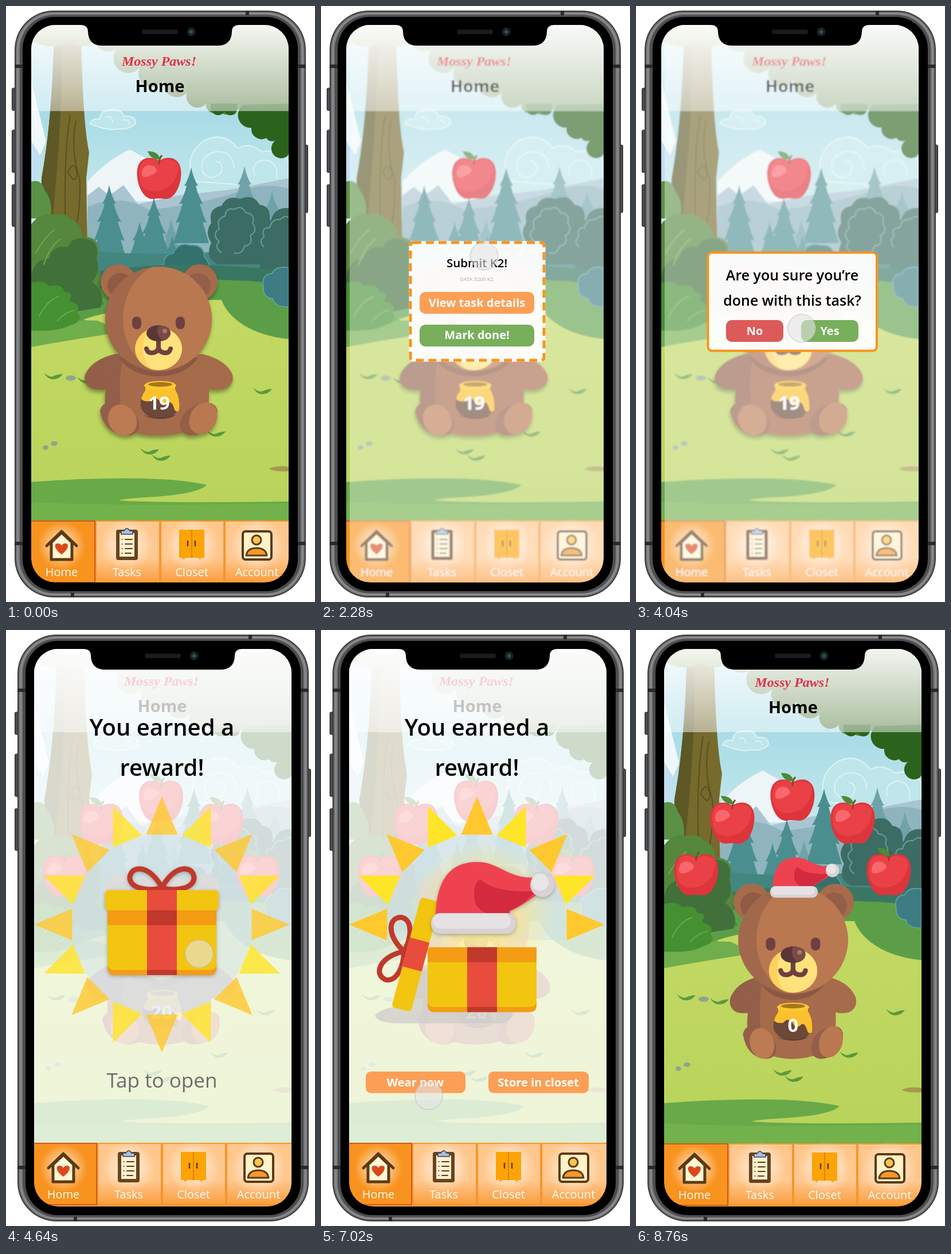
Animation, 539 px wide and 1038 px high, one loop 9680 ms. Source, as an HTML page without scripts:

```html
<!DOCTYPE html>
<html lang="en">
<head>
<meta charset="utf-8">
<title>Bear task app</title>
<style>
html, body { margin: 0; width: 100%; height: 100%; overflow: hidden; background: #fff; }
svg { display: block; width: 539px; height: 1038px; }
text { font-family: "Open Sans", "Noto Sans", sans-serif; text-anchor: middle; }
.logo { font: italic 700 24px "Liberation Serif", serif; fill: #e0304a; }
.title { font-size: 29px; font-weight: 700; }
.tab { font-size: 20px; fill: #fff; }
.count { font-size: 33px; font-weight: 700; fill: #fff; }
.btn { font-size: 20px; font-weight: 700; fill: #fff; }
.ask { font-size: 25px; font-weight: 600; }
.big { font-size: 40px; font-weight: 600; }
.shade { filter: drop-shadow(-1px 5px 3px #0005); }
.soft { filter: drop-shadow(0 2px 3px #0004); }

.phone, .dim, .task, .sure, .reward, .closed, .open, .tap { animation: 9.68s step-end infinite; }
.phone { animation-name: phone; }
.dim { animation-name: dim; }
.task { animation-name: task; }
.sure { animation-name: sure; }
.reward { animation-name: reward; }
.closed { animation-name: closed; }
.open { animation-name: open; }
.tap { animation-name: tap; }
.done { animation: done 9.68s linear infinite; }
.cursor { animation: move 9.68s linear infinite; }

@keyframes phone { 0% { transform: none; } 47.934%, 100% { transform: translate(5px, 0); } }
@keyframes dim { 0% { visibility: hidden; } 16.942% { visibility: visible; } 47.934%, 100% { visibility: hidden; } }
@keyframes task { 0% { visibility: hidden; } 16.942% { visibility: visible; } 33.678%, 100% { visibility: hidden; } }
@keyframes sure { 0% { visibility: hidden; } 33.678% { visibility: visible; } 47.934%, 100% { visibility: hidden; } }
@keyframes reward { 0% { visibility: hidden; } 47.934%, 100% { visibility: visible; } }
@keyframes closed { 0% { visibility: hidden; } 47.934% { visibility: visible; } 61.364%, 100% { visibility: hidden; } }
@keyframes open { 0% { visibility: hidden; } 61.364% { visibility: visible; } 81%, 100% { visibility: hidden; } }
@keyframes done {
  0% { opacity: 0; }
  75.62% { opacity: 0; animation-timing-function: ease-out; }
  80.99%, 100% { opacity: 1; }
}
@keyframes tap {
  0%, 16.942%, 33.678%, 47.934%, 61.364%, 75%, 100% { transform: none; }
  15.909%, 32.645%, 46.694%, 60.331%, 73.967% { transform: scale(.95); }
}
@keyframes move {
  0% { transform: translate(565px, 20px); }
  3.51% { transform: translate(565px, 20px); animation-timing-function: cubic-bezier(.16, 1, .3, 1); }
  10.74% { transform: translate(282px, 299px); }
  22.52% { transform: translate(282px, 299px); animation-timing-function: cubic-bezier(.16, 1, .3, 1); }
  32.23% { transform: translate(287px, 561px); }
  41.53% { transform: translate(287px, 561px); animation-timing-function: ease; }
  45.25% { transform: translate(337px, 564px); }
  55.37% { transform: translate(337px, 564px); animation-timing-function: ease; }
  58.88% { transform: translate(289px, 540px); }
  66.53% { transform: translate(289px, 540px); animation-timing-function: ease-in; }
  68.6% { transform: translate(356px, 680px); animation-timing-function: ease-out; }
  72.52% { transform: translate(188px, 811px); }
  73.97% { transform: translate(188px, 811px); }
  80.99% { transform: translate(187px, 797px); }
  88.22% { transform: translate(187px, 797px); animation-timing-function: ease-in; }
  90.45%, 100% { transform: translate(566px, 144px); }
}
</style>
</head>
<body>
<svg viewBox="0 0 539 1038">
<defs>
  <linearGradient id="sky" x2="0" y2="1"><stop offset=".3" stop-color="#a3d9e5"/><stop offset="1" stop-color="#d5efee"/></linearGradient>
  <linearGradient id="veil" x2="0" y2="1"><stop stop-color="#fff" stop-opacity=".95"/><stop offset="1" stop-color="#fff" stop-opacity=".48"/></linearGradient>
  <linearGradient id="grass" x2="0" y2="1"><stop stop-color="#c3d964"/><stop offset="1" stop-color="#b8d35a"/></linearGradient>
  <linearGradient id="cell" x2="0" y2="1"><stop stop-color="#ffc78c"/><stop offset=".6" stop-color="#ffc88f"/><stop offset="1" stop-color="#fb9d3d"/></linearGradient>
  <radialGradient id="glow"><stop offset=".35" stop-color="#fff" stop-opacity=".55"/><stop offset="1" stop-color="#fff" stop-opacity="0"/></radialGradient>
  <radialGradient id="gold"><stop offset=".4" stop-color="#ffe873" stop-opacity=".6"/><stop offset="1" stop-color="#ffe873" stop-opacity="0"/></radialGradient>
  <filter id="blur" x="0" y="0" width="1" height="1"><feGaussianBlur stdDeviation="1.3"/></filter>
  <clipPath id="screen"><rect x="44" y="33" width="449" height="971" rx="42"/></clipPath>
  <clipPath id="inset"><rect x="50" y="33" width="443" height="971"/></clipPath>
  <clipPath id="upper"><rect y="280" width="539" height="260"/></clipPath>
  <clipPath id="face"><ellipse cx="266" cy="545" rx="93" ry="91"/></clipPath>
  <clipPath id="snout"><ellipse cx="266" cy="597" rx="41" ry="37"/></clipPath>

  <path id="pine" d="M0 0Q4 20 12 32L8 32Q12 50 21 64L15 63Q20 82 27 97L20 95 31 132H-31L-20 95-27 97Q-20 82-15 63L-21 64Q-12 50-8 32L-12 32Q-4 20 0 0Z"/>
  <path id="tuft" d="M-16-6Q-6 2 0 0 8-4 17-4 10 6-2 5-10 4-16-6Z" fill="#5c9a3d"/>

  <g id="bg">
    <rect x="44" y="33" width="449" height="400" fill="url(#sky)"/>
    <path d="M44 130L70 236 58 264H44Z" fill="#eff7fa"/>
    <path d="M44 235L62 264 44 320Z" fill="#c3def0"/>
    <g fill="#bfe6ea" stroke="#dcf3f3" stroke-width="2">
      <path d="M328 305Q308 262 345 235 380 217 404 248 425 236 446 254 480 246 493 272V318Z"/>
      <path d="M146 205Q150 195 164 197 164 181 184 181 202 179 205 192 226 190 226 204 220 215 195 214 178 218 146 205Z"/>
      <path d="M398 284Q396 250 364 254 338 262 342 286 354 308 374 292 382 274 366 270 M472 300Q476 270 450 268 426 274 434 294 M215 206Q215 196 203 199 M186 203Q186 190 174 194" fill="none"/>
    </g>
    <path d="M142 306Q176 268 216 250L242 264 300 340H142Z" fill="#edf5f7"/>
    <path d="M142 330L162 315 180 330 205 312 230 345 300 330 390 320 493 300V470H142Z" fill="#aac4d2"/>
    <path d="M142 350Q200 325 250 355 340 345 400 325 450 305 493 318V470H142Z" fill="#8fb4bd"/>
    <g fill="#6fa3a9"><use href="#pine" x="416" y="279"/><use href="#pine" x="464" y="322"/><use href="#pine" x="288" y="372"/></g>
    <g fill="#4b8e90">
      <use href="#pine" x="180" y="312"/><use href="#pine" x="258" y="333"/><use href="#pine" x="323" y="281"/>
      <use href="#pine" x="233" y="376"/><use href="#pine" x="290" y="400"/>
    </g>
    <path d="M140 425Q250 440 493 420V540H140Z" fill="#438680"/>
    <g fill="#3c6c63">
      <path d="M370 450Q346 440 358 412 346 394 358 378 352 352 376 348 386 328 408 336 432 326 442 346 462 348 460 372 474 386 464 404 476 424 460 450Z"/>
      <path d="M440 470Q444 440 452 426 436 412 448 398 440 378 462 374 468 350 493 352V470Z"/>
    </g>
    <g fill="none" stroke="#63a097" stroke-width="2">
      <path d="M376 430q-14-10-4-20-14-12 0-22-6-18 10-22 2-16 16-12 14-8 20 6 18 2 12 18 10 14-4 22 6 16-10 18-4 16-18 12"/>
      <path d="M450 420q-10-10 0-18-6-16 10-16 4-16 18-14 8-8 15-4"/>
    </g>
    <path d="M275 450Q276 432 292 431 300 410 322 417 345 415 346 437 356 445 354 465H275Z" fill="#34706d" stroke="#559994" stroke-width="2"/>
    <path d="M160 462Q300 440 493 462V545H160Z" fill="#397762"/>
    <path d="M120 500Q280 470 400 478 450 478 493 490V620H44V530Z" fill="#5c9e48"/>
    <path d="M44 590Q110 575 200 562 160 556 135 546 180 530 260 525 330 510 376 512C388 545 430 574 493 580V900H44Z" fill="url(#grass)"/>
    <path d="M44 560Q110 545 160 548 190 563 215 566 120 580 44 594Z" fill="#70ad4c"/>
    <path d="M449 490Q444 468 464 466 470 452 493 456V524Q468 524 466 510 448 508 449 490Z" fill="#3d7c82" stroke="#66a7a9" stroke-width="1.500"/>
    <path d="M44 829Q260 814 350 834 335 851 240 856 205 858 197 861 260 866 493 863V910H44Z" fill="#69a947"/>
    <path d="M44 864Q200 872 493 866V910H44Z" fill="#72b14b"/>
    <path d="M458 806Q475 799 493 803V810Q470 812 458 806Z" fill="#a79850"/>
    <g fill="#8fa58c"><ellipse cx="113" cy="648" rx="9" ry="4.500"/><ellipse cx="84" cy="762" rx="6" ry="4"/><ellipse cx="69" cy="769" rx="5" ry="4"/></g>
    <use href="#tuft" x="447" y="671"/><use href="#tuft" x="250" y="776"/><use href="#tuft" x="366" y="745"/><use href="#tuft" x="140" y="652"/><use href="#tuft" x="270" y="787"/><use href="#tuft" x="82" y="645"/>
    <path d="M84 33Q82 190 62 300L60 410H142L140 300 145 255Q133 200 131 33Z" fill="#766a2d"/>
    <path d="M84 33Q82 190 62 300V400H78Q100 200 98 33Z" fill="#5d5826"/>
    <path d="M112 190Q100 260 104 390M122 200Q112 250 128 300 132 340 120 400M108 290q10-24 16 0-2 24-16 0" fill="none" stroke="#57521f" stroke-width="2"/>
    <path d="M44 306Q62 300 68 322 82 338 78 370H44Z" fill="#5b9144"/>
    <path d="M44 380Q60 358 84 364 102 358 114 372 134 380 132 402 160 400 162 425 155 450 166 470 160 500 172 520 130 535 44 540Z" fill="#55873d"/>
    <path d="M44 470Q50 440 75 440 80 415 108 420 116 400 142 406 164 412 158 440 166 465 150 480 175 500 165 525 110 535 44 540Z" fill="#41703a"/>
    <path d="M44 482Q68 476 75 488 98 482 102 498 120 498 110 514 134 520 124 534 138 548 112 556 90 568 44 565Z" fill="#459030"/>
    <path d="M52 430q16-28 32-40M66 450q10-30 28-44M58 540q14-28 34-34M90 548q14-16 30-18" fill="none" stroke="#6da850" stroke-width="2" stroke-linecap="round"/>
    <path d="M44 33H200Q190 62 160 58 140 80 110 62 80 80 44 60Z" fill="#71903c"/>
    <path d="M165 33a20 20 0 0 0 28 42a22 22 0 0 0 40 32a22 22 0 0 0 44 20a22 22 0 0 0 42 18a18 18 0 0 0 30 25a14 14 0 0 0 24 12a12 12 0 0 0 22 0L420 178H493V33Z" fill="#5d8145"/>
    <path d="M357 176a13 13 0 0 0 24 8a12 12 0 0 0 22-2L404 170H357Z M414 172a22 22 0 0 0 14 40a18 18 0 0 0 26 18a12 12 0 0 0 16 4a16 16 0 0 0 20 28L493 258V170Z" fill="#2b631c"/>
  </g>

  <rect id="veilbar" x="40" y="28" width="460" height="155" fill="url(#veil)"/>
  <g id="titles"><text class="logo" x="267" y="104">Mossy Paws!</text><text class="title" x="268.500" y="150">Home</text></g>

  <g id="apple">
    <path d="M0-31C-8-37-22-39-30-32-40-24-40-6-36 8-31 25-22 36-10 35-5 34 5 34 10 35 22 36 31 25 36 8 40-6 40-24 30-32 22-39 8-37 0-31Z" fill="#dd353c"/>
    <path d="M0-29C-8-35-20-36-28-30-36-22-36-6-32 8-26 20-14 25 4 20 22 14 32 0 34-22 28-36 10-36 0-29Z" fill="#ea4147"/>
    <path d="M-30-12Q-27-27-12-23-4-20-4-13-15-2-27-3-31-5-30-12Z" fill="#f8686c"/>
    <path d="M0-25Q-1-34 5-41" fill="none" stroke="#7c4b2a" stroke-width="3"/>
    <path d="M-20-48Q-2-49 2-34-14-32-20-48Z" fill="#4c8a37"/>
  </g>
  <g id="four"><use href="#apple" x="-105" y="40"/><use href="#apple" x="105" y="40"/><use href="#apple" x="-168" y="130"/><use href="#apple" x="168" y="130"/><use href="#apple"/></g>

  <g id="body">
    <path d="M190 606Q150 616 138 642 134 660 152 667 175 672 200 660Z" fill="#935f48"/>
    <path d="M342 606Q384 616 395 642 399 660 380 667 358 672 334 660Z" fill="#a66b4b"/>
    <path d="M190 606H342Q366 690 342 730 306 748 266 748 226 748 190 730 166 680 190 606Z" fill="#a66b4b"/>
    <path d="M190 606H206Q190 660 208 740 166 725 174 668Z" fill="#935f48"/>
    <path d="M196 612Q220 645 266 645 312 645 336 612Z" fill="#8b5843"/>
    <path d="M164 705Q168 688 188 692 220 696 232 724 236 746 212 748 172 746 164 705Z" fill="#935f48"/>
    <ellipse cx="203" cy="721" rx="24" ry="28" fill="#bd7b54" transform="rotate(-32 203 721)"/>
    <path d="M369 705Q365 688 345 692 312 696 304 724 300 746 324 748 362 746 369 705Z" fill="#935f48"/>
    <ellipse cx="344" cy="718" rx="23" ry="29" fill="#b97850" transform="rotate(32 344 718)"/>
  </g>
  <g id="head">
    <circle cx="196" cy="481" r="31" fill="#a66b4b"/><circle cx="199" cy="487" r="22" fill="#8f5b45"/>
    <circle cx="338" cy="481" r="31" fill="#a66b4b"/><circle cx="335" cy="487" r="22" fill="#935f48"/>
    <g clip-path="url(#face)"><rect x="170" y="450" width="194" height="190" fill="#a2684b"/><ellipse cx="292" cy="545" rx="88" ry="100" fill="#b97850"/></g>
    <rect x="220" y="541" width="16" height="22" rx="8" fill="#6e4140"/><rect x="296" y="541" width="16" height="22" rx="8" fill="#6e4140"/>
    <g clip-path="url(#snout)"><rect x="224" y="555" width="84" height="82" fill="#fed25f"/><ellipse cx="277" cy="597" rx="38" ry="46" fill="#ffe27c"/></g>
    <path d="M245 597Q247 605 256 604 266 602 266 594V578V594Q266 602 276 604 285 605 287 597" fill="none" stroke="#6e4140" stroke-width="8" stroke-linecap="round" stroke-linejoin="round"/>
    <ellipse cx="266" cy="570" rx="21" ry="14" fill="#5b3638"/>
    <path d="M266 557Q287 556 287 570 285 580 272 582 260 570 266 557Z" fill="#7a4a45"/><circle cx="277" cy="566" r="4" fill="#a07a72"/>
  </g>
  <g id="pot">
    <path d="M244 672Q233 682 235 698 242 718 269 719 296 718 302 698 303 682 293 672Z" fill="#6b4839"/>
    <path d="M240 712Q269 724 297 711 288 719 269 719 250 719 240 712Z" fill="#553a30"/>
    <path d="M243 660H295V668Q304 682 302 704 296 710 293 700 289 686 282 692 274 700 268 688 260 678 252 688 240 690 236 684 238 676 243 670Z" fill="#fbc02d"/>
    <ellipse cx="269" cy="661" rx="28" ry="8" fill="#fdc830"/><ellipse cx="269" cy="659" rx="21" ry="4" fill="#a9761c"/>
  </g>
  <g id="bear"><use href="#body"/><use href="#head"/><use href="#pot"/></g>

  <g id="hat">
    <path d="M200 497Q202 404 272 404C314 404 328 438 384 430L378 460Q348 482 329 490V497Z" fill="#ef4251"/>
    <path d="M268 472Q264 440 278 434 302 458 374 455 350 482 329 488V497H300Q272 490 268 472Z" fill="#d32a40"/>
    <circle cx="386" cy="444" r="21" fill="#d9d3d5"/><circle cx="382" cy="439" r="15" fill="#eae5e6"/>
    <rect x="192" y="493" width="148" height="36" rx="16" fill="#d9d2d5"/><rect x="195" y="494" width="136" height="26" rx="13" fill="#e6e1e2"/>
  </g>

  <g id="nav">
    <rect x="38" y="896" width="470" height="118" fill="#f9a04a"/>
    <rect x="38" y="897" width="117" height="107" fill="#f8931f" stroke="#cf5a1c" stroke-width="2"/>
    <g fill="url(#cell)" stroke="#f9942a" stroke-width="2"><rect x="157" y="897" width="111" height="107"/><rect x="270" y="897" width="110" height="107"/><rect x="382" y="897" width="120" height="107"/></g>
    <g fill="url(#glow)"><circle cx="97" cy="940" r="42"/><circle cx="211" cy="938" r="46"/><circle cx="324" cy="938" r="46"/><circle cx="437" cy="940" r="48"/></g>
    <g stroke="#5c3a14" stroke-width="5" stroke-linejoin="round" stroke-linecap="round">
      <path d="M79 934V964H115V934L97 917Z" fill="#fff6d3"/><path d="M71 940L97 915 123 940" fill="none"/>
      <rect x="195" y="915" width="32" height="47" rx="1" fill="#fff0cf" stroke="#68431d" stroke-width="6"/>
      <rect x="413" y="915" width="50" height="49" rx="5" fill="#fff1c8" stroke-width="4"/>
      <g stroke-width="3"><circle cx="437" cy="930" r="8" fill="#fbc24c"/><path d="M419 957Q421 944 437 944 453 944 455 957Z" fill="#f8972a"/></g>
      <path d="M208 929H220M208 937H220M208 945H220M208 953H218M202.500 929h.1M202.500 937h.1M202.500 945h.1M202.500 953h.1" stroke-width="2"/>
    </g>
    <path d="M97 955C82 944 84 935 91 936Q95 936 97 940 99 936 103 936C110 935 111 945 97 955Z" fill="#d9481c"/>
    <path d="M201 920V914H206Q211 906 216 914H221V920Z" fill="#a9bfd8" stroke="#3c4560" stroke-width="1.500"/>
    <path d="M302 912H346V961H341L338 964 335 961H313L310 964 307 961H302Z" fill="#fca306"/>
    <path d="M324 912V961" stroke="#e08300" stroke-width="2"/><path d="M317 931V941M330 931V941" stroke="#5c3a14" stroke-width="2.500"/>
    <g class="tab"><text x="97" y="993">Home</text><text x="211" y="993">Tasks</text><text x="324" y="993">Closet</text><text x="437.500" y="993">Account</text></g>
  </g>

  <g id="home">
    <use href="#bg"/><use href="#veilbar"/><use href="#titles"/>
    <use href="#apple" x="267" y="301"/>
    <use href="#bear" class="shade"/><text class="count" x="267" y="703">19</text>
    <use href="#nav"/>
  </g>

  <g id="rays">
    <path d="M272 290L244.400 356.500H299.600Z" fill="#ffc82e"/>
    <path d="M272 290L244.400 356.500H299.600Z" fill="#ffe527" transform="rotate(22.500 272 513)"/>
  </g>
  <g id="halfsun"><use href="#rays"/><use href="#rays" transform="rotate(45 272 513)"/><use href="#rays" transform="rotate(90 272 513)"/><use href="#rays" transform="rotate(135 272 513)"/></g>
  <g id="sun"><use href="#halfsun"/><use href="#halfsun" transform="rotate(180 272 513)"/></g>

  <g id="lid">
    <path d="M272 449C246 456 215 450 216 430 220 408 252 410 272 449 292 410 324 408 328 430 329 450 298 456 272 449Z" fill="none" stroke="#c0392b" stroke-width="9" stroke-linejoin="round"/>
    <rect x="173" y="453" width="198" height="35" rx="6" fill="#f2c511"/><rect x="246" y="453" width="52" height="35" fill="#e84c3d"/>
  </g>
  <g id="box">
    <path d="M177 488H367V589Q367 601 355 601H189Q177 601 177 589Z" fill="#f39c14"/>
    <path d="M177 514H367V580Q367 592 355 592H189Q177 592 177 580Z" fill="#f2c511"/>
    <path d="M246 488H298V601H246Z" fill="#c0392b"/><path d="M246 514H298V592H246Z" fill="#e84c3d"/>
  </g>
</defs>

<g class="phone">
  <g fill="#4a4b4d" stroke="#222" stroke-width="1"><rect x="10.500" y="143" width="7" height="39" rx="2"/><rect x="10.500" y="216" width="7" height="74" rx="2"/><rect x="10.500" y="311" width="7" height="73" rx="2"/><rect x="519" y="242" width="7.500" height="118" rx="2"/></g>
  <rect x="15" y="8" width="508" height="1022" rx="68" fill="#3a3a3c"/>
  <rect x="17" y="10" width="504" height="1018" rx="66" fill="#6d6e70"/>
  <rect x="20.500" y="13" width="497" height="1012" rx="63" fill="#77787a" stroke="#8f9092" stroke-width="2"/>
  <rect x="24" y="15.500" width="490" height="1007" rx="60" fill="#4c4d4f"/>
  <path d="M15 105H29M509 105H523M15 936H29M509 936H523M421 8V16M116 1022V1030" stroke="#2a2a2b" stroke-width="6"/>
  <rect x="29" y="19" width="480" height="1000" rx="56"/>

  <g clip-path="url(#screen)">
    <use href="#home"/>

    <g class="dim">
      <g clip-path="url(#inset)"><use href="#home" filter="url(#blur)"/><rect x="50" y="33" width="443" height="971" fill="#fff" opacity=".38"/></g>
    </g>
    <g class="task">
      <rect x="156" y="412" width="233" height="205" rx="5" fill="#fff" fill-opacity=".94" stroke="#fff" stroke-width="5"/>
      <rect x="156" y="412" width="233" height="205" rx="5" fill="none" stroke="#f7941d" stroke-width="5" stroke-dasharray="14 8"/>
      <text x="272" y="455" font-size="20.500" font-weight="600">Submit K2!</text>
      <text x="271.500" y="478.500" font-size="9" font-weight="600" fill="#bbb">DATA 3200 K2</text>
      <rect x="172" y="498" width="200" height="38" rx="10" fill="#fc9f56"/><text class="btn" x="272" y="524">View task details</text>
      <rect x="172" y="555" width="200" height="38" rx="10" fill="#78af5b"/><text class="btn" x="272" y="580">Mark done!</text>
    </g>
    <g class="sure">
      <rect x="125.500" y="429.500" width="294.500" height="171" rx="7" fill="#fff" fill-opacity=".95" stroke="#f7941d" stroke-width="4"/>
      <g class="ask"><text x="272.500" y="478">Are you sure you’re</text><text x="272.500" y="522">done with this task?</text></g>
      <rect x="157" y="547" width="100" height="38" rx="10" fill="#dc5a57"/><text class="btn" x="207" y="573">No</text>
      <rect x="288" y="547" width="100" height="38" rx="10" fill="#78af5b"/><text class="btn" x="338" y="573">Yes</text>
    </g>

    <g class="reward" transform="translate(-5)">
      <use href="#bg" x="5" y="-5"/><use href="#veilbar" x="5" y="-5"/><use href="#titles" x="4" y="-7"/>
      <use href="#four" x="270.500" y="299"/>
      <use href="#bear" x="4" y="-26"/><text class="count" x="271" y="677">20</text>
      <rect x="44" y="28" width="460" height="870" fill="#fff" opacity=".77"/>
      <use href="#nav" x="3" y="-3"/>
      <g class="big"><text x="272" y="184">You earned a</text><text x="272" y="254">reward!</text></g>
      <g class="closed">
        <circle cx="271.500" cy="513" r="157" fill="#c8dce6" opacity=".4"/>
        <use href="#sun" opacity=".8"/>
        <g class="soft"><use href="#box"/><use href="#lid"/></g>
        <text x="272" y="797" font-size="35" fill="#6c6c6c">Tap to open</text>
      </g>
      <g class="open">
        <g clip-path="url(#upper)"><circle cx="271.500" cy="513" r="157" fill="#c8dce6" opacity=".4"/><use href="#sun"/></g>
        <circle cx="282" cy="490" r="125" fill="url(#gold)"/>
        <path d="M94 671Q110 655 150 655L175 590H200V645H330Q345 672 318 685H130Q98 684 94 671Z" fill="#cfcdca" opacity=".75"/>
        <use href="#lid" transform="translate(165 565) rotate(-75) translate(-272 -470)"/>
        <use href="#box" x="9" y="64.500"/>
        <use href="#hat" class="soft"/>
        <rect x="78" y="769" width="174" height="37.500" rx="9" fill="#fc9f56"/><text class="btn" x="164.500" y="795">Wear now</text>
        <rect x="292" y="769" width="175" height="37.500" rx="9" fill="#fc9f56"/><text class="btn" x="379" y="795">Store in closet</text>
      </g>
    </g>

    <g class="done"><g transform="translate(-5)">
      <use href="#bg" x="5" y="-5"/><use href="#veilbar" x="5" y="-5"/><use href="#titles" x="5.500" y="-5"/>
      <use href="#four" x="273" y="297"/>
      <use href="#body" transform="translate(46.600 -1) scale(.853 1)"/>
      <use href="#head" transform="matrix(1.03 0 0 1.03 0 -21.600)"/>
      <use href="#pot" x="5" y="-4"/><text class="count" x="274" y="700">0</text>
      <use href="#hat" transform="translate(126.500 170) scale(.56)"/>
      <use href="#nav" x="5" y="-2"/>
    </g></g>
  </g>

  <path d="M130 30V33Q143 33 143 45 144 69 168 69H369Q393 69 394 45 394 33 407 33V30Z"/>
  <rect x="237" y="41" width="63" height="8" rx="4" fill="#1b1b1c"/>
  <circle cx="323" cy="45" r="7.500" fill="#1a2428"/><circle cx="323" cy="45" r="3" fill="#2d5560"/>
</g>

<g class="cursor"><circle class="tap" r="24.300" fill="#e4e4e4" fill-opacity=".6" stroke="#b4b4b4" stroke-opacity=".8"/></g>
</svg>
</body>
</html>
```
